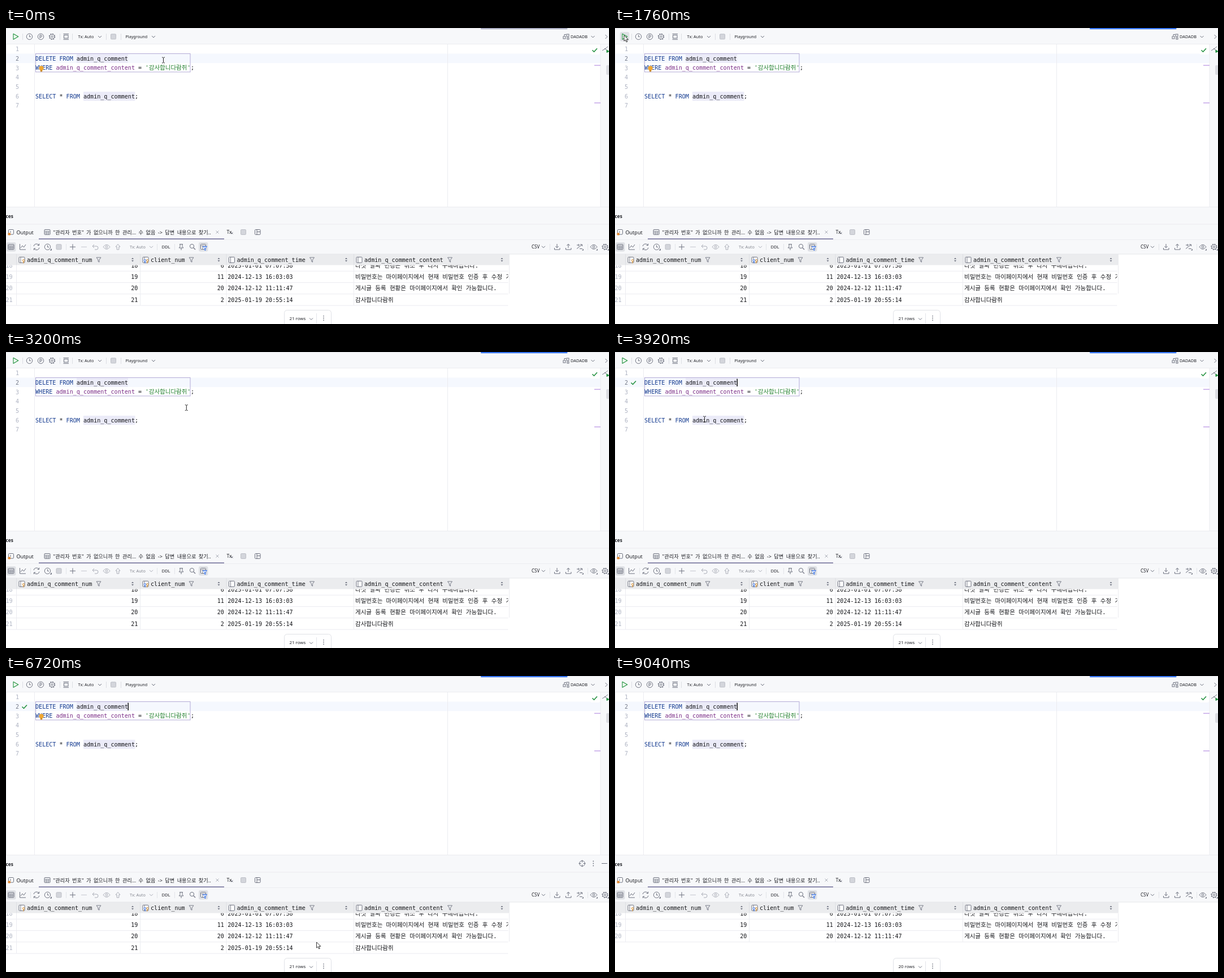
Animation of 1067x525 px, one loop 9120 ms. Source, as an HTML page:

```html
<!DOCTYPE html>
<html lang="ko">
<head>
<meta charset="utf-8">
<title>Deleting a row</title>
<style>
html, body { margin: 0; width: 100%; height: 100%; overflow: hidden; background: #fff; }
svg { display: block; width: 100%; height: 100%; }
text { white-space: pre; }
.ui { font-family: "Noto Sans", "Noto Sans CJK KR", sans-serif; }
.mono { font-family: "DejaVu Sans Mono", "Noto Sans CJK KR", monospace; }
</style>
</head>
<body>
<svg id="stage" viewBox="0 0 1067 525"></svg>
<script>
const LOOP = 9120, STEP = 80;
const INK = '#6c707e', PALE = '#c3c5cd', LINE = '#ebecf0', PANEL = '#f7f8fa';
const BLUE = '#3574f0', GREEN = '#249240', KEY = '#12398f', FIELD = '#7a2c86', STR = '#23802f';

// Drawing helpers that return markup
const rect = (x, y, w, h, fill, more = '') =>
  `<rect x="${x}" y="${y}" width="${w}" height="${h}" fill="${fill}" ${more}/>`;
const path = (d, stroke = INK, w = 1, fill = 'none') =>
  `<path d="${d}" stroke="${stroke}" stroke-width="${w}" fill="${fill}" stroke-linejoin="round"/>`;
const ring = (x, y, r, stroke = INK, fill = 'none', more = '') =>
  `<circle cx="${x}" cy="${y}" r="${r}" stroke="${stroke}" fill="${fill}" ${more}/>`;
const dot = (x, y, r, fill) => `<circle cx="${x}" cy="${y}" r="${r}" fill="${fill}"/>`;
const text = (cls, x, y, s, size, fill, more = '') =>
  `<text class="${cls}" x="${x}" y="${y}" font-size="${size}" fill="${fill}" ${more}>${s}</text>`;
const ui = (x, y, s, size, fill = '#1f2026', more) => text('ui', x, y, s, size, fill, more);
const mono = (x, y, s, fill = '#15161a', more) => text('mono', x, y, s, 10.08, fill, more);
const korean = (x, y, s, fill = '#15161a') => text('mono', x, y, s, 10.5, fill);
const group = (id, body) => `<g id="${id}">${body}</g>`;
const vline = (x, y1, y2, c = LINE) => rect(x, y1, 1, y2 - y1, c);
const hline = (x1, x2, y, c = LINE) => rect(x1, y, x2 - x1, 1, c);

// Icons, placed by their centre
const chevron = (x, y, c = INK) => path(`M${x - 3} ${y - 1.5}l3 3 3-3`, c);
const box = (x, y, s = 9, fill = '#d3d5db') =>
  rect(x - s / 2, y - s / 2, s, s, fill, 'rx="1.2" stroke="#b9bbc3" stroke-width=".9"');
const clock = (x, y) => ring(x, y, 5.2) + path(`M${x} ${y - 3}v3.3h2.6`);
const gear = (x, y) => ring(x, y, 4.2) + ring(x, y, 1.6) +
  ring(x, y, 5.1, INK, 'none', 'stroke-dasharray="2 2" stroke-width="1.2"');
const table = (x, y) => rect(x - 5, y - 4.5, 10, 9, 'none', `rx="1" stroke="${INK}"`) +
  path(`M${x - 5} ${y - 1.5}h10M${x - 5} ${y + 1.5}h10M${x - 1.7} ${y - 1.5}v6M${x + 1.7} ${y - 1.5}v6`, INK, .8);
const eye = (x, y, c) => path(`M${x - 6} ${y}q6-8 12 0q-6 8-12 0z`, c) + ring(x, y, 1.8, c);
const funnel = (x, y, c = INK) => path(`M${x - 4} ${y - 4}h8l-3 4.2v4l-2-1.2v-2.8z`, c, .9);
const check = (x, y) => path(`M${x - 4} ${y}l3 3 5.5-6`, GREEN, 1.6);
const sorter = (x, y) => path(`M${x - 2} ${y - 1}l2-2.4 2 2.4zM${x - 2} ${y + 1}l2 2.4 2-2.4z`, 'none', 0, INK);
const dots = (x, y, gap) => [-gap, 0, gap].map(d => dot(x, y + d, .9, INK)).join('');
const column = (x, y, key) => rect(x - 5, y - 5, 10, 10, '#fff', `rx="1.2" stroke="${INK}"`) +
  path(`M${x - 2} ${y - 5}v10`, INK, .9) +
  (key ? ring(x + 3, y + 1, 1.7, '#d98f2b', '#fff') + path(`M${x + 3} ${y + 2.7}v3.2`, '#d98f2b', 1.2) : '') +
  (key === 2 ? ring(x - 1, y + 1, 1.7, BLUE, '#fff') + path(`M${x - 1} ${y + 2.7}v3.2`, BLUE, 1.2) : '');

const rowMid = n => 37.5 + 16.7 * (n - 1);

function topBar() {
  return rect(0, 0, 1067, 28, PANEL) + hline(0, 1067, 0, '#e4e5e9') + hline(0, 1067, 28) +
    rect(840, 0, 153.5, 2.2, BLUE, 'id="focusBar" rx="1"');
}

function topIcons() {
  return path('M13 10.3L21.8 15.3L13 20.3Z', GREEN, 1.1, '#f0faf1') +
    [29, 95, 117, 177, 203].map(x => vline(x, 10, 21, '#dcdee3')).join('') +
    clock(41.5, 15.3) + ring(61.5, 15.3, 5.2) + path('M60 18.3v-5.6h2a1.6 1.6 0 0 1 0 3.3h-2') +
    gear(81.5, 15.3) +
    path('M101.5 10.5h9.5M101.5 20.3h9.5') + rect(102.5, 12.7, 7.5, 5.4, 'none', `stroke="${INK}"`) +
    ui(127.5, 18.2, 'Tx: Auto', 7.3) + chevron(166, 15.5) + box(190, 15.3) +
    ui(211.5, 18.2, 'Playground', 7.15) + chevron(261, 15.5) +
    rect(986, 15, 4, 4, 'none', `stroke="${INK}"`) + rect(992, 11, 4, 4, 'none', `stroke="${INK}"`) +
    rect(993, 17, 3, 3, 'none', `stroke="${INK}"`) + path('M988 14v-2.5h3') +
    ui(999, 18.2, 'DADADB', 7.4) + chevron(1038.5, 15.5) + path('M1060.5 12l3.5 3.5-3.5 3.5');
}

function editor() {
  const numbers = [1, 2, 3, 4, 5, 6, 7].map(n =>
    mono(23, rowMid(n) + 3.6, n, n === 2 ? '#767a8a' : '#aeb3c2', 'text-anchor="end"')).join('');
  const base = n => rowMid(n) + 3.5;
  const word = (s, fill) => `<tspan fill="${fill}">${s}</tspan>`;
  return rect(0, 29, 1067, 288, '#fff') + rect(1, 45.5, 1051, 16.7, '#f5f8fe') +
    rect(125, 46, 91, 16, '#ebebf8') + rect(137, 113, 91.5, 16, '#ebebf8') +
    vline(0, 29, 317) + vline(50, 29, 317) + vline(781, 29, 317) +
    group('selection', rect(52, 45.5, 1000, 16.7, '#cccbfc') + rect(52, 62.2, 280, 16.3, '#cccbfc')) +
    rect(1052, 29, 15, 288, PANEL) + vline(1051.5, 29, 317) +
    numbers +
    rect(52.5, 45.5, 273.5, 32.5, 'none', 'stroke="#b3abd6"') +
    mono(52, base(2), word('DELETE FROM', KEY) + ' admin_q_comment') +
    mono(52, base(3), word('WHERE', KEY) + word(' admin_q_comment_content', FIELD) + ' =') +
    mono(246.5, base(3), "'", STR) + korean(252.8, base(3), '감사합니다람쥐', STR) +
    mono(320.8, base(3), word("'", STR) + ';') +
    mono(52, base(6), word('SELECT', KEY) + ' * ' + word('FROM', KEY) + ' admin_q_comment;') +
    rect(1034, 30, 17, 17, '#fff', 'rx="3"') + check(1041.5, 39.3) +
    rect(1041, 65.5, 11, 1.6, '#c8abe9') + rect(1041, 132, 11, 1.6, '#c8abe9') +
    group('selectMark', rect(1041.5, 65.5, 10, 16.5, '#7d7ba8')) +
    path('M1055 40l5-3 5-4M1059 36l5 4', INK, .9) + path('M1063 39l4 2.5-4 2z', GREEN, 1, GREEN) +
    rect(1062, 66, 6, 17, '#dcdde2', 'rx="2"') +
    group('done', check(32.5, 54.5)) +
    group('caret', rect(215.5, 47.5, 1.4, 13.5, '#000')) +
    group('bulb', dot(62.5, 71.3, 4, '#f0a732') + rect(60.7, 74.5, 3.6, 3, '#c98a2b', 'rx="1"'));
}

function panel() {
  return rect(0, 317, 1067, 84, PANEL) + hline(0, 1067, 317) + hline(0, 1067, 347.5) + hline(0, 1067, 375) +
    ui(-.5, 337.3, 'ces', 8.3, '#1f2026', 'font-weight="700"') +
    group('panelTools', ring(1019.5, 332.5, 4.8) +
      path('M1019.5 326.5v4M1019.5 334.5v4M1013.5 332.5h4M1021.5 332.5h4') +
      dots(1039.3, 332.5, 4) + path('M1054 332.5h10')) +
    rect(4.5, 357.5, 9, 8.5, '#fff', `rx="1.2" stroke="${INK}"`) + path('M7 360l2 1.7-2 1.7') +
    rect(3.5, 363.5, 4.5, 4, '#e0872f', 'rx="1"') +
    ui(18.5, 366, 'Output', 9) + table(73, 362) +
    ui(83.5, 365.8, '"관리자 번호" 가 없으니까 한 관리... 수 없음 -&gt; 답변 내용으로 찾기..', 9.2, '#1f2026', 'word-spacing="2"') +
    path('M371.5 359.5l5 5M376.5 359.5l-5 5', '#a2a5af', .9) +
    rect(58, 373.2, 328, 1.8, '#8583a8') +
    ui(390.5, 365.2, 'Tx', 8.6) + path('M398.5 362.5l3 3M401.5 362.5l-3 3', INK, .9) +
    box(420, 362) +
    rect(440.5, 357.5, 9.5, 9, 'none', `rx="1.2" stroke="${INK}"`) + path('M444 357.5v9M444 361.5h6');
}

function gridTools() {
  const y = 388.3;
  return rect(1, 380, 16.5, 16.5, '#dfe1e5', 'rx="3"') + table(9, y) +
    path('M24.5 383v10h10.5M26 390l3-4 2.5 3 3.5-5') +
    path('M49 387a5 5 0 0 1 9-2M59 389.6a5 5 0 0 1-9 2M58.6 382.5v3h-3M49.4 394v-3h3') +
    clock(73.5, y) + path('M81 391v3.5h-3.5z', 'none', 0, INK) + box(93.5, y) +
    path('M113 388.3h10M118 383.3v10') + path('M133 388.3h10', PALE) +
    path('M156 384l-3 3 3 3M153 387h7a3 3 0 0 1 0 6h-3', '#a9acb6') +
    eye(178, y, '#a9acb6') + path('M194 388l4-4.5 4 4.5h-2.2v5h-3.6v-5z', '#a9acb6') +
    ui(219, 391, 'Tx: Auto', 7.3, '#83868f') + chevron(257, y, '#a9acb6') +
    [43, 106, 267, 298].map(x => vline(x, 383, 394, '#e2e4e9')).join('') +
    ui(275.5, 391.2, 'DDL', 7.6) +
    path('M307 383.5h6M308 383.5v4l-1.8 2.5h7.6l-1.8-2.5v-4M310 390v4') +
    ring(329, 387, 3.6) + path('M331.7 389.7l3.3 3.3', INK, 1.2) +
    rect(341, 380, 16.5, 16.5, '#dfe1e5', 'rx="3"') +
    rect(344.5, 383.5, 9, 9, '#fff', `rx="1" stroke="${INK}"`) + path('M344.5 386h9M347.5 386v6.5', INK, .8) +
    path('M348.5 387.5h7l-2.5 3v4l-2-1v-3z', BLUE, 1, '#e7effd') +
    ui(930, 391.3, 'CSV', 8) + chevron(951, y) +
    path('M975 383v6.5M972.3 387l2.7 2.8 2.7-2.8M970.5 390v3h9.5v-3') +
    path('M995 390v-6.5M992.3 386l2.7-2.8 2.7 2.8M990.5 390v3h9.5v-3') +
    path('M1010 391.5l9-7M1016 384h3.5v3M1010 385h4M1015 391.5h5M1012.5 383l2 2-2 2') +
    path('M1022 391.5v3h-3z', 'none', 0, INK) + eye(1040, y, INK) + path('M1047 391.5v3h-3z', 'none', 0, INK) +
    [962, 1029].map(x => vline(x, 383, 394, '#e2e4e9')).join('') +
    gear(1060, y) + path('M1067 391.5v3h-3z', 'none', 0, INK);
}

const heads = [
  // centre of icon, name, funnel, sorter, key style
  [28, 'admin_q_comment_num', 164, 224, 1],
  [247, 'client_num', 328, 376.5, 2],
  [399.5, 'admin_q_comment_time', 541.5, 602, 0],
  [625, 'admin_q_comment_content', 785.5, 877.5, 0]
];
const rows = [
  [18, 6, '2025-01-01 07:07:58', '다섯 날짜 변경은 취소 후 다시 구매바랍니다.'],
  [19, 11, '2024-12-13 16:03:03', '비밀번호는 마이페이지에서 현재 비밀번호 인증 후 수정 가능'],
  [20, 20, '2024-12-12 11:11:47', '게시글 등록 현황은 마이페이지에서 확인 가능합니다.'],
  [21, 2, '2025-01-19 20:55:14', '감사합니다람쥐']
];
const cols = [18, 237, 389.5, 615, 890];

function grid() {
  const body = rows.map(([num, client, time, note], i) => {
    const y = 424.6 + 20.4 * i, top = 410.5 + 20.3 * i;
    return group('row' + num,
      cols.map(x => vline(x, top, top + 20.3)).join('') + hline(0, 891, top + 20.2) +
      mono(-.5, y, num, '#aeb3c2') +
      mono(233.3, y, num, undefined, 'text-anchor="end"') +
      mono(385.8, y, client, undefined, 'text-anchor="end"') +
      mono(392.3, y, time) + korean(618, y, note));
  }).join('');
  const head = heads.map(([x, name, f, s, key]) =>
    column(x, 411.3, key) + mono(x + 9, 414.5, name) + funnel(f, 411) + sorter(s, 411)).join('');
  return rect(0, 401, 1067, 124, '#fff') +
    `<clipPath id="cells"><rect x="0" y="420.5" width="888.5" height="105"/></clipPath>` +
    `<g clip-path="url(#cells)">${body}</g>` + vline(890, 421, 471) +
    rect(0, 401, 891, 19.5, '#ebecee') + hline(0, 1067, 400.5, '#e6e7eb') +
    cols.slice(0, 4).map(x => vline(x, 401, 420.5, '#dddfe3')).join('') + head;
}

function pager() {
  return rect(492.5, 500.5, 83, 40, '#fff', 'rx="5" stroke="#dfe1e6"') +
    ui(501.5, 518, '21 rows', 7.9, '#1f2026', 'id="count"') + chevron(540, 516) +
    vline(549, 506, 524, '#e2e4e9') + dots(562, 514.5, 3.7);
}

function popup() {
  return `<filter id="shade" x="-30%" y="-80%" width="160%" height="260%"><feGaussianBlur stdDeviation="15"/></filter>` +
    rect(217, 93, 286, 82, '#000', 'rx="8" opacity=".17" filter="url(#shade)"') +
    rect(217, 63, 286, 85, '#fff', 'rx="5" stroke="#b4b7c0" stroke-width=".8"') +
    ui(361.5, 81.5, 'Statements', 8.5, '#000', 'font-weight="700" text-anchor="middle"') +
    rect(222.5, 92, 275, 18, '#d3e0fb', 'rx="3"') +
    ui(228.3, 105.2, 'DELETE FROM admin_q_comment WHERE admin_q_comment_...', 8.8, '#000') +
    ui(231.5, 123.6, 'DELETE FROM admin_q_comment WHERE admin_q_comment...', 8.8, '#000') +
    path('M217.4 133.5h285.2v9.5a5 5 0 0 1-5 4.6h-275.2a5 5 0 0 1-5-4.6z', 'none', 0, PANEL) +
    ui(218.8, 145.5, 'Customize', 8.75, '#315f96');
}

function pointers() {
  return group('arrow', path('M0 0V10.2L2.4 8L4.2 12L5.9 11.2L4.2 7.4H7.4Z', '#222', .9, '#fff')) +
    group('beam', path('M-2.5-5q2 0 2.5 1q.5-1 2.5-1M0-4v8M-2.5 5q2 0 2.5-1q.5 1 2.5 1', '#222', 1));
}

const stage = document.getElementById('stage');
stage.innerHTML = topBar() + editor() + panel() +
  rect(0, 0, 16.5, 16.5, '#dfe1e5', 'id="hover" rx="3"') +
  topIcons() + gridTools() + grid() + pager() + group('popup', popup()) + pointers();

const el = id => document.getElementById(id);
const show = (id, on) => el(id).setAttribute('display', on ? 'inline' : 'none');

// Pointer stops: time, x, y
const stops = [
  [0, 278.5, 57], [480, 278.5, 57], [1440, 16, 13], [2000, 16, 13], [2560, 298.5, 87],
  [2880, 325, 98], [3120, 325, 98], [3840, 158.5, 119], [4080, 158.5, 119], [4720, 215, 335],
  [5360, 81, 390], [5520, 81, 390], [5760, 54, 389], [6080, 54, 389], [6640, 549.5, 472],
  [7040, 549.5, 472], [7520, 549.5, 498], [7840, 549.5, 498], [8320, 700, 500], [8720, 700, 500]
];
const targets = [[17, 15.3], [41.5, 15.3], [61.5, 15.3], [81.5, 15.3], [54, 388.3], [73.5, 388.3], [118, 388.3]];

function pointerAt(t) {
  const i = stops.findIndex(s => s[0] > t);
  if (i < 0) return stops[stops.length - 1].slice(1);
  const [t0, x0, y0] = stops[i - 1], [t1, x1, y1] = stops[i];
  const u = (t - t0) / (t1 - t0), k = u * u * (3 - 2 * u);
  return [x0 + (x1 - x0) * k, y0 + (y1 - y0) * k];
}

function draw(time) {
  const t = Math.floor((time % LOOP) / STEP) * STEP;
  const picking = t >= 1920 && t < 3120;
  const reloaded = t >= 6880;
  const [x, y] = pointerAt(t);
  const inside = t < 8720;
  const typing = !picking && x > 50 && y > 28 && y < 317;

  show('popup', picking);
  show('selection', picking);
  show('selectMark', picking);
  el('focusBar').setAttribute('fill', t < 240 || picking ? '#a9abc0' : BLUE);
  show('done', t >= 3520 && !reloaded);
  show('bulb', t < 1920 || (t >= 4400 && !reloaded));
  const early = t >= 240 && t < 1920 && (t - 240) % 1000 < 500;
  show('caret', early || (t >= 3120 && (t + 400) % 1000 < 500));
  show('row21', !reloaded);
  el('count').textContent = reloaded ? '20 rows' : '21 rows';
  show('panelTools', inside && y > 317);

  const over = inside && targets.find(([a, b]) => Math.abs(x - a) < 8.5 && Math.abs(y - b) < 8.5);
  show('hover', over);
  if (over) el('hover').setAttribute('transform', `translate(${over[0] - 8.2} ${over[1] - 8.2})`);

  show('arrow', inside && !typing);
  show('beam', inside && typing);
  el(typing ? 'beam' : 'arrow').setAttribute('transform', `translate(${x} ${y})`);
}

const start = performance.now();
function tick() {
  draw(performance.now() - start);
  requestAnimationFrame(tick);
}
tick();
</script>
</body>
</html>
```
